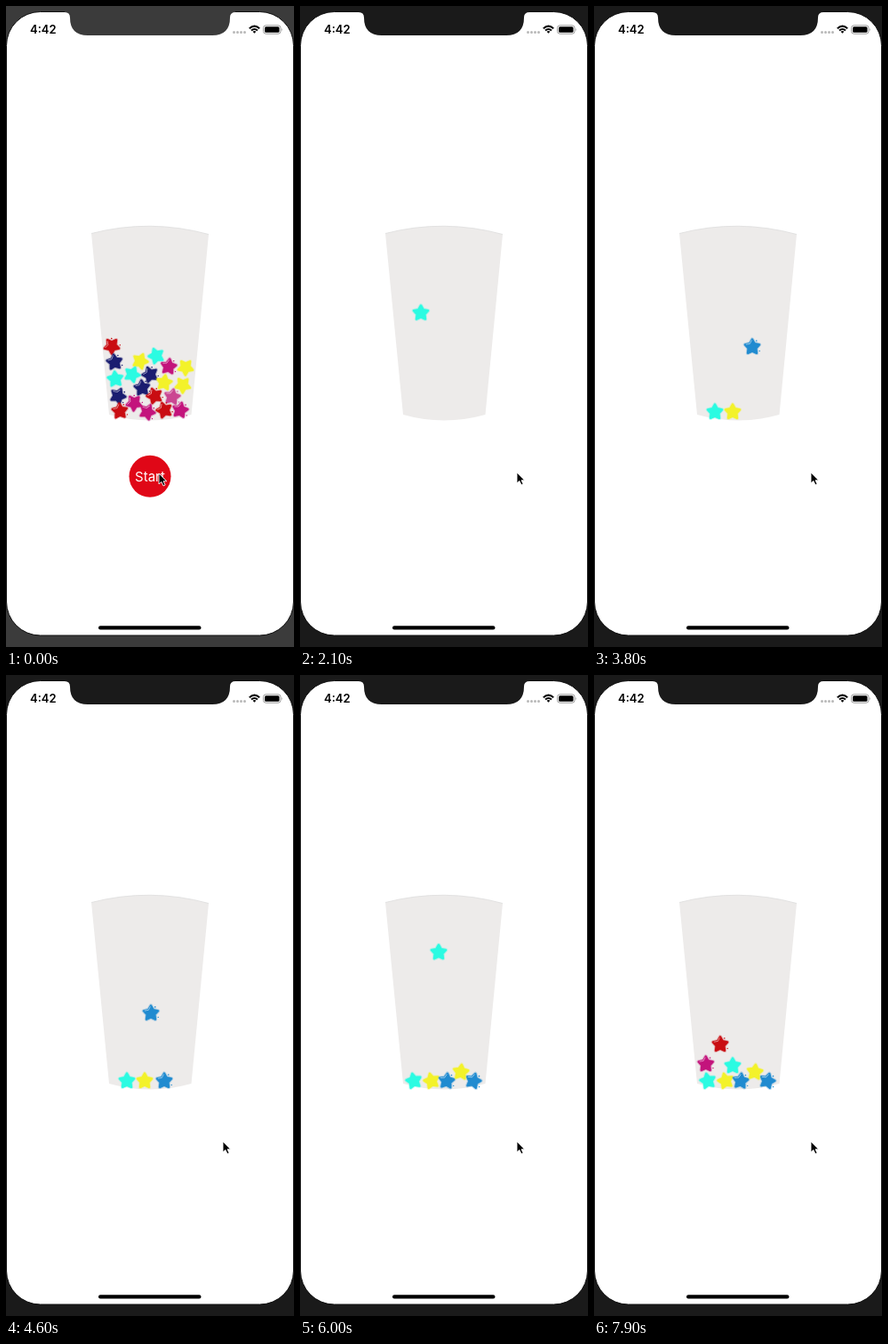
Animation, 324 px wide and 720 px high, one loop 8 s. Source, as an HTML page:

```html
<!DOCTYPE html>
<html lang="en">
<head>
<meta charset="utf-8">
<title>Star cup</title>
<style>
  html, body { margin: 0; width: 100%; height: 100%; overflow: hidden; background: #1a1a1a; }
  svg { display: block; width: 324px; height: 720px; }
  text { font-family: Inter, "Liberation Sans", sans-serif; }
</style>
</head>
<body>
<svg viewBox="0 0 324 720">
  <rect id="bezel" width="324" height="720" fill="#3b3b3b"/>
  <rect x=".5" y="6.5" width="323" height="700.5" rx="38" fill="#fff" stroke="#111"/>
  <path id="notch" d="M66 0V7Q72 7 72 13Q72 33 92 33H232Q252 33 252 13Q252 7 258 7V0Z" fill="#3b3b3b"/>

  <text x="27" y="31" font-size="13" font-weight="600">4:42</text>
  <g fill="#b9b9b9">
    <circle cx="256.5" cy="29.5" r="1.5"/><circle cx="260.5" cy="29.5" r="1.5"/>
    <circle cx="264.5" cy="29.5" r="1.5"/><circle cx="268.5" cy="29.5" r="1.5"/>
  </g>
  <g fill="none" stroke="#000" stroke-width="2">
    <path d="M273.8 25.2Q279.5 20 285.2 25.2M276 27.6Q279.5 24.4 283 27.6"/>
    <path d="M277.6 28.8Q279.5 27.2 281.4 28.8L279.5 30.8Z" fill="#000" stroke="none"/>
  </g>
  <rect x="289.5" y="21.8" width="19.5" height="9.4" rx="2.8" fill="none" stroke="#999"/>
  <rect x="291" y="23.3" width="16.5" height="6.4" rx="1.5"/>
  <path d="M310.2 25V28.2Q311.6 26.6 310.2 25Z" fill="#999"/>

  <path d="M96 255.5Q162 238.5 228 256.5L208.5 459Q162 472 116 459Z" fill="#edebea"/>
  <path d="M96 255.5Q162 238.5 228 256.5" fill="none" stroke="#dededd" stroke-width=".8"/>

  <g id="pile"></g>
  <g id="drops"></g>

  <g id="button">
    <circle cx="162" cy="528.3" r="23.5" fill="#e00717"/>
    <text x="162" y="533.7" font-size="15" fill="#fff" text-anchor="middle">Start</text>
  </g>
  <rect x="104" y="696.3" width="115.5" height="4.2" rx="2.1"/>
  <path id="cursor" d="M0 0V12L2.9 9.5L5 14L7.1 13L5.1 8.8H8.8Z" stroke="#fff" stroke-width=".9"/>
</svg>
<script>
const LOOP = 8000, STEP = 100;
const RESET = 700, HIDE = 1600;      // cup emptied, button gone
const TOP = 258, GRAVITY = 783;      // px, px/s²
const BUMPS = [4720, 5534], SHOVE = 350;
const COLORS = {
  r: '#c90d12', n: '#1a1d70', c: '#2bfbe2', y: '#f3f22a',
  m: '#c3147c', p: '#cb4792', b: '#208bd0'
};

const $ = id => document.getElementById(id);

function add(parent, tag, attrs) {
  const el = document.createElementNS('http://www.w3.org/2000/svg', tag);
  for (const k in attrs) el.setAttribute(k, attrs[k]);
  return parent.appendChild(el);
}

const starPath = 'M' + Array.from({ length: 10 }, (_, i) => {
  const r = i % 2 ? 4.6 : 8.4, a = i * Math.PI / 5;
  return (r * Math.sin(a)).toFixed(2) + ' ' + (-r * Math.cos(a)).toFixed(2);
}).join('L') + 'Z';

function addStar(parent, key) {
  const fill = COLORS[key], g = add(parent, 'g', { 'stroke-linejoin': 'round' });
  add(g, 'path', { d: starPath, fill, stroke: fill, 'stroke-width': 4.4, opacity: .3 });
  add(g, 'path', { d: starPath, fill, stroke: fill, 'stroke-width': 2.4 });
  if (!'cy'.includes(key)) {
    add(g, 'path', { d: 'M-7.2 -2.8L-2.6 -3.6L-.6 -7.6', fill: 'none', stroke: '#fff', 'stroke-width': .9, opacity: .55 });
    add(g, 'circle', { cx: 4.8, cy: -7, r: .8, fill });
    add(g, 'circle', { cx: 8.2, cy: 4.5, r: .7, fill });
  }
  return g;
}

function place(el, x, y, turn = 0) {
  el.setAttribute('transform', `translate(${x.toFixed(2)} ${y.toFixed(2)}) rotate(${turn.toFixed(1)})`);
}

const pile = [
  ['r', 119, 382], ['n', 122, 400], ['y', 151, 399], ['c', 169, 393], ['m', 183, 405],
  ['y', 202, 406], ['c', 123, 419], ['c', 142, 414], ['n', 162, 414], ['y', 178, 423],
  ['y', 199, 426], ['n', 153, 429], ['n', 126, 438], ['r', 167, 438], ['p', 187, 439],
  ['m', 144, 446], ['r', 128, 455], ['m', 159, 456], ['r', 178, 454], ['m', 196, 454]
];
pile.forEach(([key, x, y], i) => place(addStar($('pile'), key), x, y, i * 29 % 72 - 36));

// start time, column, landing height, then the pose [x, y, turn] after each bump
const drops = [
  { key: 'c', at: 1629, x: 136, y: 456, poses: [[132, 456, -7], [128, 456, -12]] },
  { key: 'y', at: 2429, x: 156, y: 456, poses: [[151, 456, -8], [148, 456, -14]] },
  { key: 'b', at: 3235, x: 178, y: 456, poses: [[187, 456, 10], [195, 456, 16]] },
  { key: 'b', at: 4042, x: 163, y: 438, poses: [[169, 452, 12], [165, 456, 6]] },
  { key: 'y', at: 4856, x: 180, y: 437, poses: [null, [181, 446, 6]] },
  { key: 'c', at: 5630, x: 156, y: 439, poses: [] },
  { key: 'm', at: 6410, x: 116, y: 437, poses: [] },
  { key: 'r', at: 7240, x: 142, y: 415, poses: [] }
];
for (const d of drops) d.el = addStar($('drops'), d.key);

const clamp = v => Math.max(0, Math.min(1, v));
const easeOut = v => 1 - (1 - v) ** 2;
const wall = y => 96 + (y - 255) * 20 / 205;

function drawDrop(d, t) {
  const s = (t - d.at) / 1000;
  d.el.style.display = s < 0 ? 'none' : '';
  if (s < 0) return;
  let pose = [d.x, Math.min(d.y, TOP + GRAVITY * s * s / 2), 0];
  d.poses.forEach((to, i) => {
    const k = easeOut(clamp((t - BUMPS[i]) / SHOVE));
    if (to && k > 0) pose = pose.map((v, j) => v + (to[j] - v) * k);
  });
  const [x, y, turn] = pose;
  place(d.el, Math.max(x, wall(y) + 12), y, turn);
}

function draw(t) {
  const full = t < RESET;
  for (const id of ['bezel', 'notch']) $(id).setAttribute('fill', full ? '#3b3b3b' : '#1a1a1a');
  $('pile').style.display = full ? '' : 'none';
  $('button').style.display = t < HIDE ? '' : 'none';
  const k = clamp((t - 900) / 600), e = k * k * (3 - 2 * k);
  place($('cursor'), 172 + 72 * e, 525 - e);
  for (const d of drops) drawDrop(d, t);
}

const start = performance.now();
function tick() {
  const t = (performance.now() - start) % LOOP;
  draw(Math.floor(t / STEP) * STEP);
  requestAnimationFrame(tick);
}
tick();
</script>
</body>
</html>
```
